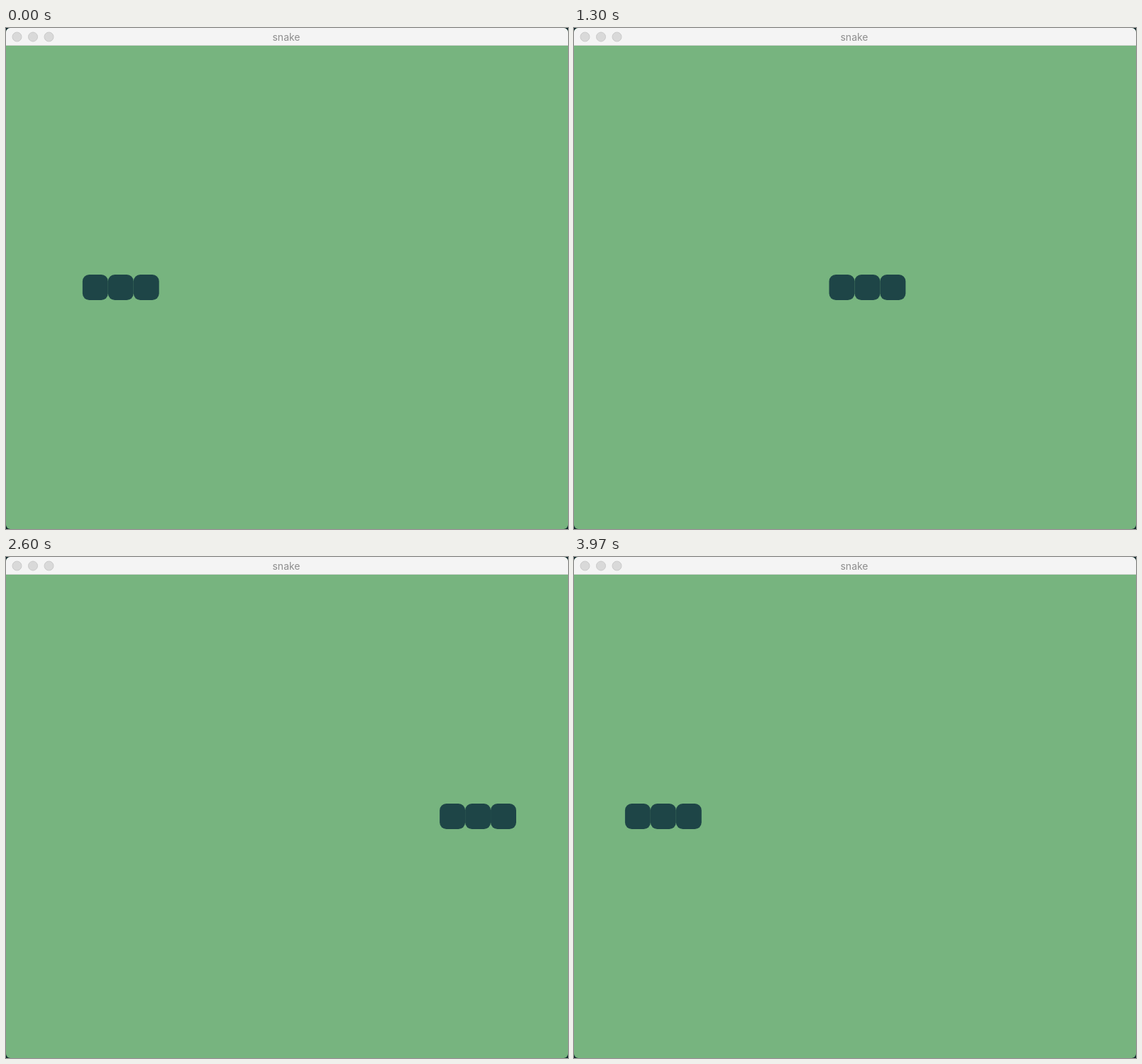
An HTML page that plays this animation: 792x707 px, repeating every 4130 ms.

```html
<!DOCTYPE html>
<html lang="en">
<head>
<meta charset="utf-8">
<title>snake</title>
<style>
  html, body { margin: 0; width: 100%; height: 100%; overflow: hidden; background: #0c2229; }
  svg { display: block; }
  .title { font: 14px Inter, sans-serif; fill: #8e8e8e; text-anchor: middle; }
  .buttons { fill: #d9d9d9; stroke: #c9c9c9; }
  .snake { fill: #1e4547; }
</style>
</head>
<body>
<svg width="792" height="707" viewBox="0 0 792 707">
  <defs>
    <clipPath id="window"><rect width="792" height="707" rx="6"/></clipPath>
  </defs>
  <g clip-path="url(#window)">
    <rect width="792" height="707" fill="#77b47f"/>
    <rect width="792" height="25" fill="#f4f4f4"/>
    <rect y="24" width="792" height="1" fill="#d2d8d2"/>
    <g class="buttons">
      <circle cx="15.5" cy="12.5" r="6.5"/>
      <circle cx="38" cy="12.5" r="6.5"/>
      <circle cx="60.5" cy="12.5" r="6.5"/>
    </g>
    <text class="title" x="395" y="18">snake</text>
    <g class="snake">
      <rect y="348" width="35.95" height="35.95" rx="9.5"/>
      <rect y="348" width="35.95" height="35.95" rx="9.5"/>
      <rect y="348" width="35.95" height="35.95" rx="9.5"/>
    </g>
  </g>
</svg>
<script>
  const LOOP = 4130;
  const CELL = 35.95;
  const COLUMNS = 22;
  const START_COLUMN = 3;
  // Moments at which the snake advances by one cell.
  const STEP_TIMES = [130, 300, 530, 730, 900, 1100, 1300, 1470, 1670, 1870, 2030,
    2230, 2430, 2600, 2800, 3000, 3200, 3400, 3600, 3770, 3970];
  const segments = document.querySelectorAll('.snake rect');

  function draw() {
    const time = performance.now() % LOOP;
    const steps = STEP_TIMES.filter(t => t <= time).length;
    segments.forEach((segment, i) => {
      const column = (START_COLUMN + steps + i) % COLUMNS;
      segment.setAttribute('x', column * CELL);
    });
    requestAnimationFrame(draw);
  }
  draw();
</script>
</body>
</html>
```
